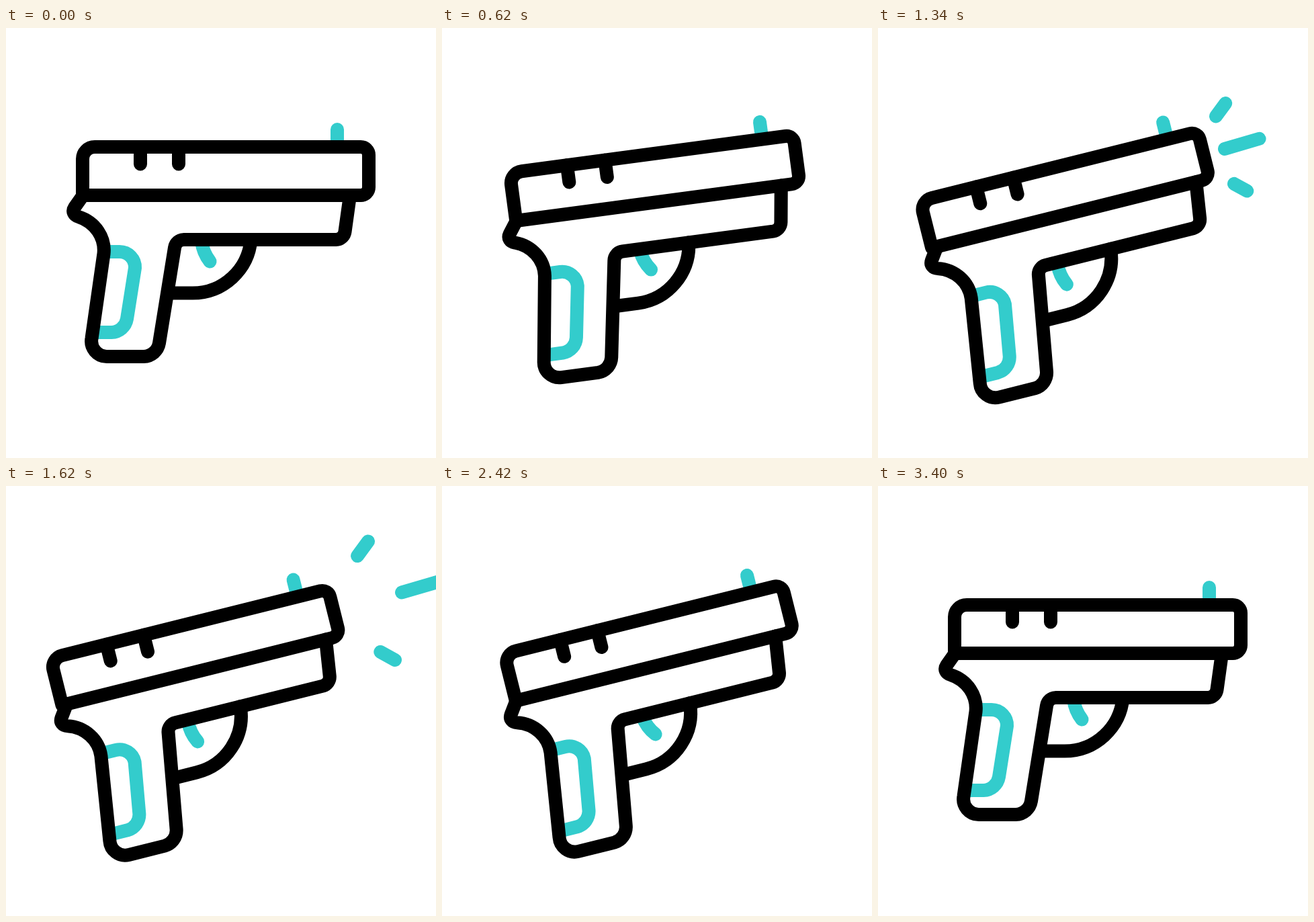
An HTML page that plays this animation: 640x640 px, repeating every 3.6 s.

```html
<!DOCTYPE html>
<html lang="en">
<head>
<meta charset="utf-8">
<title>Icon animation</title>
<style>
  html, body { margin: 0; width: 100%; height: 100%; overflow: hidden; background: #fff; }
  svg { display: block; width: 100%; height: 100%; }
  path { fill: none; stroke: #000; stroke-width: 20; stroke-linecap: round; stroke-linejoin: round; }
  .accent { stroke: #3cc; }
</style>
</head>
<body>
<svg viewBox="0 0 640 640">
  <g id="flash"><path class="accent"/><path class="accent"/><path class="accent"/></g>
  <g id="gun">
    <g id="frame">
      <path id="trigger" class="accent" d="M291 317Q293 334 303.5 347.5"/>
      <path class="accent" d="M149 333H169A23 23 0 0 1 192 357L180 433A24 24 0 0 1 157 453H132"/>
      <path d="M512 249L504.5 303A14 14 0 0 1 491 315H265A14 14 0 0 0 251 327L228 469A24 24 0 0 1 205 489H150A23 23 0 0 1 127.5 462L145.5 336C148 312 133 289 108 281C101 279 98 273 102 267L114 250"/>
      <path d="M248 394.5H278A87 87 0 0 0 364.5 315"/>
    </g>
    <g id="slide">
      <path class="accent" d="M493 151V172"/>
      <path d="M114 249V195A18 18 0 0 1 132 177H528A12 12 0 0 1 540 189V237A12 12 0 0 1 528 249Z"/>
      <path d="M200 177V202.5M257 177V202.5"/>
    </g>
  </g>
</svg>
<script>
const LOOP = 3600, STEP = 20;
const [gun, frame, slide, trigger] = ['gun', 'frame', 'slide', 'trigger']
  .map(id => document.getElementById(id));
const rayPaths = document.querySelectorAll('#flash path');

// Ray start and full extent: x, y, dx, dy
const rays = [
  [501, 130, 36, -49],
  [514, 178.5, 131, -38.5],
  [528, 230.5, 49, 27]
];
const shots = [
  { start: 1200, lag: 20, dx: 2, dy: 1.4 },
  { start: 1880, lag: 0, dx: 0, dy: 0 }
];

function ease(t, from, to) {
  const u = Math.min(1, Math.max(0, (t - from) / (to - from)));
  return u * u * (3 - 2 * u);
}

function move(part, transform) {
  part.setAttribute('transform', transform);
}

function drawFlash(t) {
  const shot = shots.find(s => t > s.start && t < s.start + 540);
  rayPaths.forEach((path, i) => {
    let d = '';
    if (shot) {
      const [x, y, dx, dy] = rays[i];
      const begin = shot.start + shot.lag;
      const head = ease(t, begin, begin + 280);
      const tail = ease(t, shot.start + 280, shot.start + 540);
      const point = k => `${x + shot.dx + dx * k} ${y + shot.dy + dy * k}`;
      if (head > tail) d = `M${point(tail)}L${point(head)}`;
    }
    path.setAttribute('d', d);
  });
}

function drawGun(t) {
  const raise = ease(t, 240, 960);
  const turn = raise - ease(t, 2600, 3330);
  const shift = raise - ease(t, 2680, 3400);
  const kick = shots.reduce((sum, { start }) =>
    sum + ease(t, start, start + 280) - ease(t, start + 280, start + 540), 0);
  move(gun, `translate(${7 * shift} ${18.8 * shift}) rotate(${-14 * turn} 320 320)`);
  // Both parts recoil along the barrel, the slide further
  move(slide, `translate(${-61.5 * kick} 0)`);
  move(frame, `translate(${-47 * kick} 0)`);
  move(trigger, `rotate(${24 * kick} 282 277)`);
}

let origin;
function tick(now) {
  origin ??= now;
  const t = Math.floor(((now - origin) % LOOP) / STEP) * STEP;
  drawGun(t);
  drawFlash(t);
  requestAnimationFrame(tick);
}
requestAnimationFrame(tick);
</script>
</body>
</html>
```
